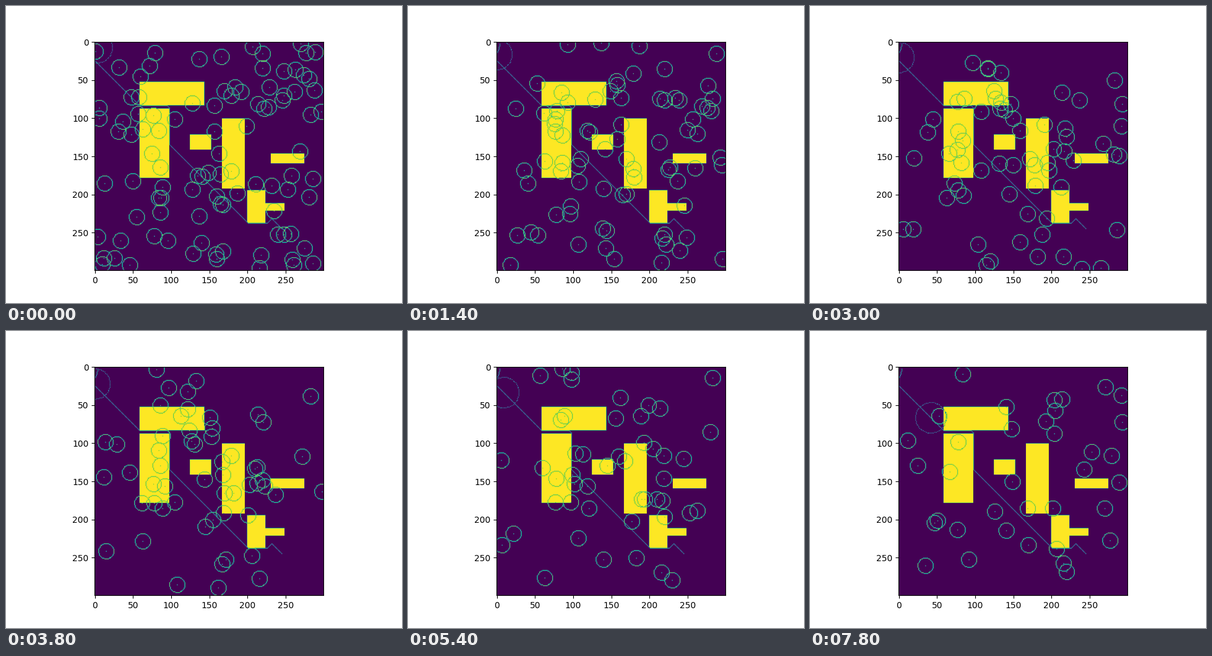
A matplotlib script for the animation above (8 s loop, 640 by 480 pixels).

```python
import random

import matplotlib.pyplot as plt
import numpy as np
from matplotlib.animation import FuncAnimation

SIZE = 300
STEPS = 40
WALL, RING, TRACK = 1.0, 0.75, 0.5
TOP_SPEED = 6

# Obstacles: left, top, right, bottom
WALLS = [
    (59, 53, 144, 84), (59, 88, 98, 179), (125, 122, 153, 142),
    (167, 101, 197, 193), (231, 147, 275, 160), (200, 195, 224, 238),
    (224, 212, 249, 222),
]

# Planned route, and the trail left by the robot
ROUTE = [(0, 25), (59, 84), (95, 84), (98, 87), (98, 135), (201, 238),
         (226, 238), (232, 232), (245, 245)]
TRAIL = [(4, 3), (3, 10), (0, 15)]

# How many movers drift out of view by each step; the last group stays
LEAVING = {7: 19, 11: 6, 15: 8, 23: 13, 31: 8, 39: 8, STEPS: 36}


def inside(x, y):
    return 0 <= x < SIZE and 0 <= y < SIZE


def exit_step(x, y, dx, dy):
    for step in range(STEPS):
        if not inside(x + dx * step, y + dy * step):
            return step
    return STEPS


def make_movers():
    rng = random.Random(12)
    movers = []
    first = 1
    for last, count in LEAVING.items():
        found = 0
        while found < count:
            mover = (rng.randrange(SIZE), rng.randrange(SIZE),
                     rng.randint(-TOP_SPEED, TOP_SPEED),
                     rng.randint(-TOP_SPEED, TOP_SPEED))
            moving = mover[2] or mover[3]
            if moving and first <= exit_step(*mover) <= last:
                movers.append(mover)
                found += 1
        first = last + 1
    return movers


def plot(grid, x, y, value):
    if inside(x, y):
        grid[int(y), int(x)] = value


def draw_line(grid, points, value):
    for (x0, y0), (x1, y1) in zip(points, points[1:]):
        n = max(abs(x1 - x0), abs(y1 - y0)) + 1
        for x, y in zip(np.linspace(x0, x1, n), np.linspace(y0, y1, n)):
            plot(grid, round(x), round(y), value)


def draw_ring(grid, x, y, radius, value):
    for a in np.arange(0, 2 * np.pi, 0.1):
        plot(grid, round(x + radius * np.cos(a)),
             round(y + radius * np.sin(a)), value)


def robot_at(step):
    """Creep down the left edge, then follow the diagonal route."""
    along = max(0, 2.75 * (step - 23.7))
    x = along + max(0, 3 - step / 2)
    y = along + np.interp(step, [0, 7, 23.7], [8, 17, 25])
    return x, y


def make_base():
    grid = np.zeros((SIZE, SIZE))
    for left, top, right, bottom in WALLS:
        grid[top:bottom, left:right] = WALL
    draw_line(grid, ROUTE, TRACK)
    return grid


BASE = make_base()
MOVERS = make_movers()


def render(step):
    grid = BASE.copy()
    rx, ry = robot_at(step)
    draw_line(grid, [p for p in TRAIL if p[1] <= ry], TRACK)
    draw_ring(grid, rx, ry, 20, TRACK)
    for x, y, dx, dy in MOVERS:
        cx, cy = x + dx * step, y + dy * step
        if inside(cx, cy):
            draw_ring(grid, cx, cy, 10, RING)
            plot(grid, cx, cy, RING)
    return grid


fig, ax = plt.subplots(figsize=(6.4, 4.8), dpi=100)
image = ax.imshow(render(0), cmap="viridis", vmin=0, vmax=1)


def update(step):
    image.set_data(render(step))
    return [image]


anim = FuncAnimation(fig, update, frames=STEPS, interval=200,
                     repeat=True, repeat_delay=0)
plt.show()
```
